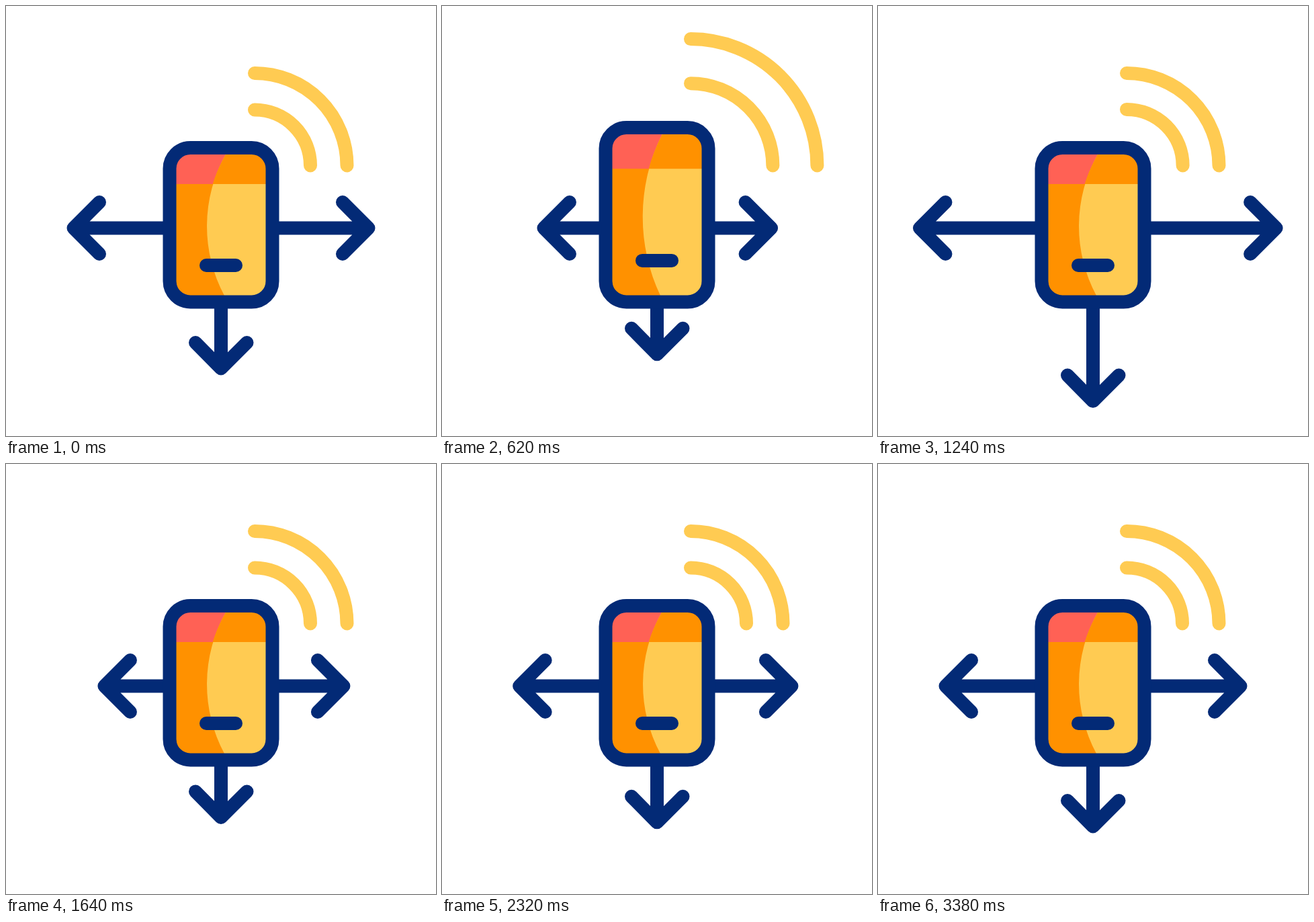
An HTML page that plays this animation: 640 by 640 pixels, repeating every 3.6 s.

```html
<!DOCTYPE html>
<html lang="en">
<head>
<meta charset="utf-8">
<title>Phone signal</title>
<style>
  html, body { margin: 0; width: 100%; height: 100%; overflow: hidden; background: #fff; }
  svg { display: block; width: 100vw; height: 100vh; }
  .line { fill: none; stroke: #032a76; stroke-width: 20; stroke-linecap: round; stroke-linejoin: round; }
  .wave { fill: none; stroke: #ffcb52; stroke-width: 20; stroke-linecap: round; }
</style>
</head>
<body>
<svg viewBox="0 0 640 640">
  <defs>
    <clipPath id="screen"><rect id="clip" x="243.5" width="153" rx="31"/></clipPath>
  </defs>
  <path id="outer" class="wave"/>
  <path id="inner" class="wave"/>
  <path id="left" class="line"/>
  <path id="right" class="line"/>
  <path id="down" class="line"/>
  <g clip-path="url(#screen)">
    <rect x="240" y="160" width="160" height="290" fill="#ff9100"/>
    <path id="head" fill="#ff6155"/>
    <path id="light" fill="#ffcb52"/>
    <path id="corner" fill="#ff9100"/>
  </g>
  <rect id="body" class="line" x="243.5" width="153" rx="31"/>
  <path id="button" class="line"/>
</svg>
<script>
const LOOP = 3600, STEP = 20;
const $ = id => document.getElementById(id);
const draw = (id, d) => $(id).setAttribute("d", d);

const smooth = u => (1 - Math.cos(Math.PI * u)) / 2;

// cubic-bezier(.33, 0, .09, 1)
function settle(u) {
  let lo = 0, hi = 1;
  for (let i = 0; i < 24; i++) {
    const s = (lo + hi) / 2, r = 1 - s;
    if (3 * r * r * s * 0.33 + 3 * r * s * s * 0.09 + s * s * s < u) lo = s;
    else hi = s;
  }
  return lo * lo * (3 - 2 * lo);
}

// keys: [time, value, easing towards this key]
function track(t, keys) {
  if (t <= keys[0][0]) return keys[0][1];
  for (let i = 1; i < keys.length; i++) {
    const [t0, a] = keys[i - 1], [t1, b, ease] = keys[i];
    if (t < t1) return a + (b - a) * ease((t - t0) / (t1 - t0));
  }
  return keys[keys.length - 1][1];
}

// Inward shift of an arrow: pull in, push out, pull in, settle.
const arrow = (t, lag, pull, push, again) => track(t, [
  [110 + lag, 0],
  [600 + lag, pull, smooth],
  [1100 + lag, -push, settle],
  [1695 + lag, again, smooth],
  [3350, 0, settle]
]);

const pulse = (t, lag, size) => track(t, [
  [110 + lag, 0],
  [605 + lag, size, smooth],
  [1205 + lag, 0, settle]
]);

const wave = (id, r) => draw(id, `M370 ${237.5 - r}A${r} ${r} 0 0 1 ${370 + r} 237.5`);

function side(id, x, dir) {
  const back = x - dir * 38.5;
  draw(id, `M${320 + dir * 76.5} 330.5H${x}M${back} 292L${x} 330.5L${back} 369`);
}

function phone(k) {
  const y = v => 440.5 - (440.5 - v) * k;
  const top = y(211), bar = y(265), mid = y(386);
  for (const id of ["body", "clip"]) {
    $(id).setAttribute("y", top);
    $(id).setAttribute("height", 440.5 - top);
  }
  const edge = `M327 ${y(221)}A218 ${218 * k} 0 0 0 325 431`;
  draw("head", `M240 ${top}H400V${bar}H240Z`);
  draw("light", `${edge}V441H400V${top}H327Z`);
  // right part of the header, bounded by the curved edge
  draw("corner", `M331 ${top}L327 ${y(221)}A218 ${218 * k} 0 0 0 307.6 ${bar}H400V${top}Z`);
  draw("button", `M298 ${mid}H342`);
}

function render(t) {
  side("left", 100.5 + arrow(t, 0, 51.5, 51.5, 48), -1);
  side("right", 539.5 - arrow(t, 90, 52, 55, 52), 1);
  const tip = 539.5 - arrow(t, 45, 21.3, 53, 18.4);
  draw("down", `M320 440V${tip}M282 ${tip - 38.5}L320 ${tip}L358.5 ${tip - 38.5}`);
  wave("outer", 137.5 + pulse(t, 0, 51));
  wave("inner", 83 + pulse(t, 138, 46));
  phone(1 + track(t, [[110, 0], [605, 0.131, smooth], [905, 0, smooth]]));
}

const start = performance.now();
function tick() {
  const t = (performance.now() - start) % LOOP;
  render(Math.floor(t / STEP) * STEP);
  requestAnimationFrame(tick);
}
render(0);
requestAnimationFrame(tick);
</script>
</body>
</html>
```
